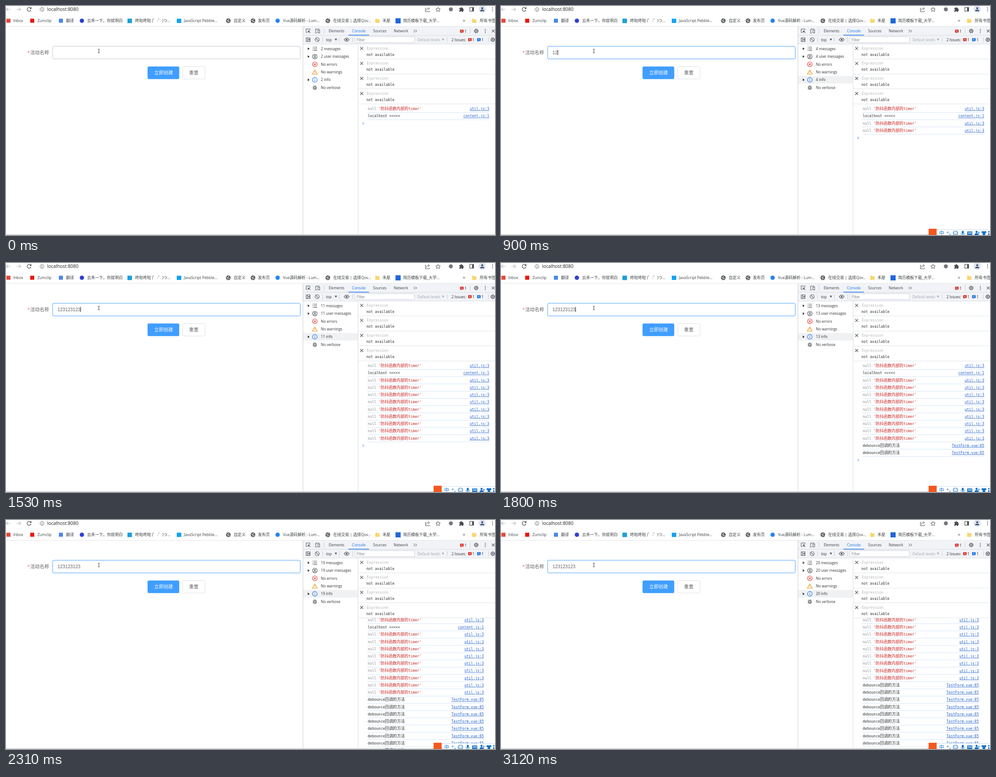
An HTML page for the animation above (3.39 s loop, 1091 by 513 pixels).

```html
<!DOCTYPE html>
<html lang="zh-CN">
<head>
<meta charset="utf-8">
<title>Debounce demo</title>
<style>
html, body { margin: 0; width: 100%; height: 100%; overflow: hidden; background: #fff; }
svg { display: block; width: 100%; height: 100%; }
text { font-family: "Open Sans", "Noto Sans CJK SC", "Noto Sans CJK", sans-serif; white-space: pre; }
.mono { font-family: "DejaVu Sans Mono", "Noto Sans CJK SC", "Noto Sans CJK", monospace; }
.field { font-family: "Liberation Sans", Arial, sans-serif; }
.link { text-decoration: underline; }
</style>
</head>
<body>
<svg id="stage" viewBox="0 0 1091 513"></svg>
<script>
const LOOP = 3390;
const ROW = 16.23, ROW_TOP = 230.3;
const DARK = '#4a4d51', BLUE = '#1a73e8', RED = '#dc362e', LINE = '#dadce0';

// start ms, message count, typed characters, caret visible
const STEPS = [
  [0, 2, 0, 0], [440, 2, 0, 1], [900, 4, 2, 1], [1020, 5, 3, 1],
  [1140, 7, 5, 1], [1260, 8, 6, 1], [1410, 10, 8, 1], [1530, 11, 9, 1],
  [1800, 13, 9, 1], [1920, 14, 9, 0], [2070, 16, 9, 0], [2190, 17, 9, 0],
  [2310, 19, 9, 0], [2460, 20, 9, 1], [3000, 20, 9, 0]
];

const escape = s => s.replace(/&/g, '&amp;').replace(/</g, '&lt;');

// Han runs get their own size, as they are set larger than the Latin ones
function text(x, y, s, { size = 8.15, han = 8.9, fill = '#303134', cls = '', end = false, id = '' } = {}) {
  const body = escape(s).replace(/[\u3000-\u9fff\uff00-\uffef]+/g, run => `<tspan font-size="${han}">${run}</tspan>`);
  return `<text x="${x}" y="${y}" font-size="${size}" fill="${fill}" class="${cls}"` +
    `${end ? ' text-anchor="end"' : ''}${id ? ` id="${id}"` : ''}>${body}</text>`;
}
const mono = (x, y, s, fill = '#2b2f33', opts = {}) => text(x, y, s, { size: 8, fill, cls: 'mono', ...opts });
const rect = (x, y, w, h, fill, extra = '') => `<rect x="${x}" y="${y}" width="${w}" height="${h}" fill="${fill}" ${extra}/>`;
const disc = (x, y, r, fill, extra = '') => `<circle cx="${x}" cy="${y}" r="${r}" fill="${fill}" ${extra}/>`;
const ring = (x, y, r, color, w = 1) => disc(x, y, r, 'none', `stroke="${color}" stroke-width="${w}"`);
const path = (d, color = DARK, w = 1, fill = 'none') => `<path d="${d}" stroke="${color}" stroke-width="${w}" fill="${fill}"/>`;
const solid = (d, fill = DARK) => `<path d="${d}" fill="${fill}"/>`;
const at = (x, y, s) => `<g transform="translate(${x} ${y})">${s}</g>`;
const hline = (x1, x2, y, color = LINE) => path(`M${x1} ${y}H${x2}`, color);
const vline = (x, y1, y2, color = '#cbced3') => path(`M${x} ${y1}V${y2}`, color);

const dots = (x, y) => [-3.6, 0, 3.6].map(d => disc(x, y + d, 1, DARK)).join('');
const cross = (x, y, r, color = DARK, w = 1.1) => path(`M${x - r} ${y - r}l${2 * r} ${2 * r}m0 ${-2 * r}l${-2 * r} ${2 * r}`, color, w);
const gear = (x, y) => disc(x, y, 4.1, 'none', `stroke="${DARK}" stroke-width="1.8" stroke-dasharray="1.7 1.52"`) +
  ring(x, y, 3.4, DARK) + disc(x, y, 1.4, DARK);
const down = (x, y, fill = DARK) => solid(`M${x - 2.6} ${y - 2}h5.2l-2.6 4.4z`, fill);
const right = (x, y) => solid(`M${x - 1.8} ${y - 2.8}l4.2 2.8l-4.2 2.8z`, '#333');
const globe = x => disc(x, 33, 5.2, '#54575b') +
  path(`M${x - 3.5} 31.5q2 2 3 1.2t1.7-3.6M${x - 1} 36.8q-.2-2 1.4-1.8t3-1.2`, '#fff', 1.1);
const folder = x => solid(`M${x} 28.5h3.6l1.2 1.3h4.7v8h-9.5z`, '#f9d56e');
const badge = (x, y, color) => rect(x, y - 3.5, 8, 6.5, color, 'rx="1"') + solid(`M${x + 1.5} ${y + 2.5}v2.4l2.4-2.4z`, color);

function browserBar() {
  const nav =
    path('M10 7.5H1M5 3.3L.8 7.5 5 11.7', '#b5b7ba', 1.1) +
    path('M23.5 7.5H32.5M28.5 3.3l4.2 4.2-4.2 4.2', '#b5b7ba', 1.1) +
    path('M55.3 5.3a4.3 4.3 0 1 0 .4 3.4', DARK, 1.3) + solid('M56.6 2v4.4h-4.4z') +
    ring(80.3, 7.7, 4.2, DARK, .9) + path('M80.3 7v3.2M80.3 5v1.1', DARK, 1) +
    text(91.8, 11.4, 'localhost:8080', { size: 10.35, fill: '#202124' });
  const actions =
    path('M937.5 5h-1.7v7.8h9V10.6M938 10q.5-4.2 5-4.2M941.8 3l3.3 2.8-3.3 2.8', DARK) +
    path('M964 2.9l1.5 3.3 3.6.3-2.7 2.4.8 3.5-3.2-1.9-3.2 1.9.8-3.5-2.7-2.4 3.6-.3z') +
    disc(992.5, 7.5, 4.5, '#77797d') +
    solid('M1011.5 4.5h2.5a1.8 1.8 0 0 1 3.6 0h2.4v2.7a1.8 1.8 0 0 1 0 3.5v2.4h-2.8a1.6 1.6 0 0 0-3.2 0h-2.5v-3a1.7 1.7 0 0 0 0-3.2z') +
    rect(1034.8, 3.2, 8.6, 8.4, 'none', `stroke="${DARK}" stroke-width="1.2"`) + rect(1040, 3, 4, 9, DARK) +
    disc(1062.5, 7.3, 8.2, '#dce4f2') + disc(1062.5, 5, 2.3, '#44546f') +
    solid('M1057.8 11.7q0-3.4 4.7-3.4t4.7 3.4z', '#44546f') + dots(1085.5, 7.5);
  return nav + actions;
}

function bookmarks() {
  const items = [
    [16, 'Inbox'], [70, 'Zumclip'], [134, '翻译'], [181, '云禾一下，你就明白'],
    [288, '咚啦咚啦 (゜-゜)つ...'], [397, 'JavaScript Pebble...'], [508, '自定义'], [562, '发布页'],
    [618, 'Vue源码解析 - Lum...'], [730, '在线交易 | 选择Qov...'], [840, '禾屋'],
    [886, '简历模板下载_大学...'], [1057, '所有书签']
  ];
  const marks =
    rect(1, 28.5, 9, 9, '#e5483b') + rect(54, 28.5, 9, 9, '#e8170d') +
    rect(118, 28.5, 9, 9, '#4a86e8') + disc(169.3, 33, 4.8, '#2c3fd8') +
    rect(271, 28.3, 10, 10, '#1b9fe0') + rect(381, 28.5, 10, 9.5, '#12a3f4') +
    disc(606, 33, 4.8, '#2582f5') + rect(869, 27.5, 11.5, 11.5, '#1f67db');
  return marks + [496, 551, 718].map(globe).join('') + folder(824) + folder(1040) +
    items.map(([x, s]) => text(x, 36.3, s, { size: 8.5, han: 8.85, fill: '#3c4043' })).join('') +
    path('M1019.5 30.8l2 2.2-2 2.2m2.4-4.4l2 2.2-2 2.2', DARK, .9) + hline(0, 1091, 45.5, '#e4e5e8');
}

function form() {
  const ui = { size: 10.3, han: 10.4 };
  return text(47.5, 108, '*', { size: 10.3, fill: '#f56c6c' }) +
    text(54, 107.7, '活动名称', { ...ui, han: 10.5, fill: '#606266' }) +
    '<rect id="box" x="104" y="90.2" width="552.5" height="28.4" rx="3" fill="#fff"/>' +
    text(115, 107.7, '', { size: 10.2, fill: '#606266', cls: 'field', id: 'typed' }) +
    rect(0, 98.3, 1, 11.6, '#222', 'id="caret"') +
    rect(315.8, 135.4, 70.7, 28.4, '#409eff', 'rx="3"') + text(330.8, 153.3, '立即创建', { ...ui, fill: '#fff' }) +
    rect(394.2, 135.7, 50, 27.8, '#fff', 'rx="3" stroke="#dcdfe6"') + text(408.6, 153.3, '重置', { ...ui, fill: '#606266' }) +
    path('M205 96.8h1.5l.6.6.6-.6h1.5M207.1 97.4v7M205 105h1.5l.6-.6.6.6h1.5', '#222', .9);
}

function toolbars() {
  const tabs = [[720, 'Elements'], [772, 'Console'], [819, 'Sources'], [865, 'Network']];
  return rect(663, 46, 428, 39, '#f1f3f7') + hline(663, 1091, 65.8) + hline(663, 1091, 85.2) +
    path('M672 59.5h-2.2v-8h8.4v2.6', DARK, 1, 'none') + path('M678.8 60.4l-4.6-4.6m0 4v-4h4', DARK, 1.2) +
    path('M691 58.5v-6.7h8.4M689 60.2h5', DARK, 1.1) + rect(696, 54, 3.8, 6.2, '#f1f3f7', `stroke="${DARK}"`) +
    vline(709.5, 50, 62) +
    tabs.map(([x, s]) => text(x, 59.2, s, { fill: s === 'Console' ? BLUE : '#3c4043' })).join('') +
    rect(764, 64.6, 46, 1.5, BLUE) +
    path('M909.5 53l3 3-3 3m4-6l3 3-3 3', DARK, 1) +
    badge(1013, 56.6, RED) + cross(1017, 56.3, 1.3, '#fff', .8) + text(1023, 60, '1') + vline(1035.5, 50, 62) +
    gear(1049, 56) + dots(1069.3, 56) + cross(1087, 56, 3.2) +
    rect(669.8, 71.4, 8.6, 8.2, 'none', `stroke="${DARK}"`) + vline(672.5, 71, 80, DARK) + solid('M677.2 73l-3.5 2.5 3.5 2.5z') +
    ring(694.3, 75.5, 4.5, DARK, 1.1) + path('M691.2 72.4l6.2 6.2', DARK, 1.1) + vline(706.5, 70, 81) +
    text(714, 78.6, 'top') + down(736, 75.3) + vline(743.5, 70, 81) +
    path('M754.3 75.5q5.7-7.6 11.4 0q-5.7 7.6-11.4 0z', DARK, 1.1) + disc(760, 75.5, 1.9, DARK) + vline(773.5, 70, 81) +
    rect(778.5, 68.7, 133, 13.3, '#fff', 'rx="1.5" stroke="#cdd1d6"') + text(782, 78.7, 'Filter', { fill: '#75797e' }) +
    text(918, 78.6, 'Default levels', { fill: '#a5a8ac' }) + down(975, 75.3, '#a5a8ac') + vline(984.5, 70, 81) +
    text(994, 78.6, '2 Issues:') +
    badge(1031, 75.5, RED) + cross(1035, 75.2, 1.3, '#fff', .8) + text(1040.5, 78.6, '1') +
    badge(1051, 75.5, BLUE) + path('M1053 74.2h4m-4 1.8h3', '#fff', .7) + text(1061, 78.6, '1') +
    vline(1076.5, 70, 81) + gear(1086, 75.5);
}

function sidebar() {
  const y = i => 95.8 + i * 17.4;
  const icons = [
    path('M-2.5-3.6h7.5M-2.5 0h7.5M-2.5 3.6h7.5', DARK, 1.1) + path('M-5-3.6h1.4M-5 0h1.4M-5 3.6h1.4', DARK, 1.2),
    ring(0, 0, 5.2, DARK, 1.1) + ring(0, -1.3, 1.7, DARK, 1.1) + path('M-3.6 3.6q3.6-3 7.2 0', DARK, 1.1),
    ring(0, 0, 5.3, RED, 1.1) + cross(0, 0, 2.3, RED),
    path('M0-4.8l5.5 9.5h-11z', '#e8920c', 1.1) + path('M0-1.5v3M0 2.4v1.1', '#e8920c', 1.1),
    ring(0, 0, 5.3, BLUE, 1.1) + path('M0-.6v3.4M0-2.9v1.2', BLUE, 1.2),
    rect(-2.3, -3, 4.6, 7, 'none', `rx="2.3" stroke="${DARK}" stroke-width="1.2"`) +
      path('M-4.6-1.8h2.3m4.6 0h2.3M-4.6.6h2.3m4.6 0h2.3M-4.6 3h2.3m4.6 0h2.3M-2.4-5l1.3 1.8M2.4-5l-1.3 1.8M-1 0h2M-1 2h2', DARK, .9)
  ];
  const labels = ['', '', 'No errors', 'No warnings', '', 'No verbose'];
  return rect(663, 156.8, 122, 16.8, '#f0f1f2', 'id="hover"') +
    icons.map((icon, i) => at(689, y(i), icon)).join('') +
    [0, 1, 4].map(i => right(675, y(i))).join('') +
    labels.map((s, i) => text(702.6, y(i) + 3, s, { id: 'label' + i })).join('') +
    vline(662.5, 46, 512) + vline(785.5, 86, 512, LINE);
}

function expressions() {
  return [0, 1, 2, 3].map(i => {
    const y = 95 + i * 33.65;
    return cross(793.5, y, 3.3) + mono(805, y + 2.8, 'Expression', '#b4b6b9') +
      mono(804, y + 16.7, 'not available') + hline(786, 1091, Math.round(y + 23) + .5, '#dfe3e8');
  }).join('');
}

function consoleRows() {
  let rows = '';
  for (let i = 0; i < 20; i++) {
    const y = ROW_TOP + i * ROW, base = y + 2.9;
    const isNull = i !== 1 && i < 11;
    const file = isNull ? 'util.js:3' : i === 1 ? 'content.js:1' : 'TestForm.vue:85';
    const message = isNull
      ? mono(807, base, 'null', '#85898e') + mono(831, base, "'防抖函数内部的timer'", '#c5221f')
      : mono(807, base, i === 1 ? 'localhost <<<<<' : 'debounce回调的方法');
    rows += `<g class="row">${message}<g class="edge">` +
      mono(1078, base, file, '#1f5fc9', { cls: 'mono link', end: true }) + '</g>' +
      `<path class="rule" d="M806 ${y + 8.2}H1078" stroke="#d6e4f9"/></g>`;
  }
  return '<clipPath id="view"><rect x="786" y="219.5" width="305" height="292.5"/></clipPath>' +
    `<g clip-path="url(#view)"><g id="scroll">${rows}<g id="prompt">` +
    path('M795.6 -2.2l2.6 2.5-2.6 2.5', '#5b98f2', 1.1) + '</g></g></g>';
}

function inputBar() {
  const c = '#1470c4';
  return '<g id="ime">' + rect(972, 500.5, 119, 13, '#fff') + hline(972, 1091, 500.5, '#c9def0') +
    rect(954, 499, 18, 14, '#f4581f') +
    text(977.4, 512.8, '中', { han: 11.2, fill: c }) + ring(996.7, 507.3, 1.4, c) + path('M1001.6 510.4q.5 1.7-.8 2.6', c, 1.5) +
    ring(1014, 509, 5, c, 1.2) + path('M1011.5 510q2.5 3 5 0M1012.3 507v1.2m3.4-1.2v1.2', c, 1.1) +
    rect(1028, 503.5, 4.4, 7, c, 'rx="2.2"') + path('M1026 508.5q0 3.8 4.2 3.8t4.2-3.8M1030.2 512v1', c, 1) +
    rect(1040, 505, 11.5, 8, c, 'rx="1"') + path('M1041.5 507.3h9m-9 2.4h9', '#fff', 1, 'none') +
    disc(1061, 506, 2.4, c) + solid('M1056.5 513q0-4.2 4.5-4.2t4.2 4.2z', c) + path('M1064 507.5h4M1066 505.5v7', c, 1.1) +
    solid('M1074.5 504l-3 2.4 1.5 2.4 1.5-.8v5h6v-5l1.5.8 1.5-2.4-3-2.4q-3 2-6 0z', c) +
    rect(1087, 504, 2.5, 3.5, c) + rect(1087, 509, 2.5, 4, c) + '</g>';
}

const stage = document.getElementById('stage');
stage.innerHTML = rect(0, 0, 1091, 513, '#fff') + browserBar() + bookmarks() + form() + toolbars() +
  sidebar() + expressions() + consoleRows() + hline(0, 1091, 512.5, '#b5b7ba') + inputBar();

const $ = id => document.getElementById(id);
const rowNodes = [...stage.querySelectorAll('.row')];
const edgeNodes = [...stage.querySelectorAll('.edge')];
const ruleNodes = [...stage.querySelectorAll('.rule')];
const show = (node, on) => node.setAttribute('visibility', on ? 'visible' : 'hidden');
const move = (node, x, y) => node.setAttribute('transform', `translate(${x} ${y})`);

function render(ms) {
  const [, count, typed, caret] = STEPS.filter(step => step[0] <= ms).pop();
  const overflowing = count > 17;
  const scroll = !overflowing ? 0 : 6.3 + (count - 19) * 2 * ROW;

  $('typed').textContent = '123123123'.slice(0, typed);
  $('caret').setAttribute('x', 115 + typed * 5.67);
  show($('caret'), caret);
  $('box').setAttribute('stroke', ms >= 590 ? '#409eff' : '#c0c4cc');
  show($('ime'), ms >= 440);
  show($('hover'), ms >= 900);

  $('label0').textContent = count + ' messages';
  $('label1').textContent = count + ' user messages';
  $('label4').textContent = count + ' info';

  rowNodes.forEach((row, i) => show(row, i < count));
  edgeNodes.forEach(edge => move(edge, overflowing ? -12 : 0, 0));
  ruleNodes.forEach(rule => rule.setAttribute('d', rule.getAttribute('d').replace(/H.*/, 'H' + (overflowing ? 1066 : 1078))));
  move($('scroll'), 0, -scroll);
  move($('prompt'), 0, ROW_TOP + count * ROW);
}

const start = performance.now();
function tick() {
  render((performance.now() - start) % LOOP);
  requestAnimationFrame(tick);
}
tick();
</script>
</body>
</html>
```
